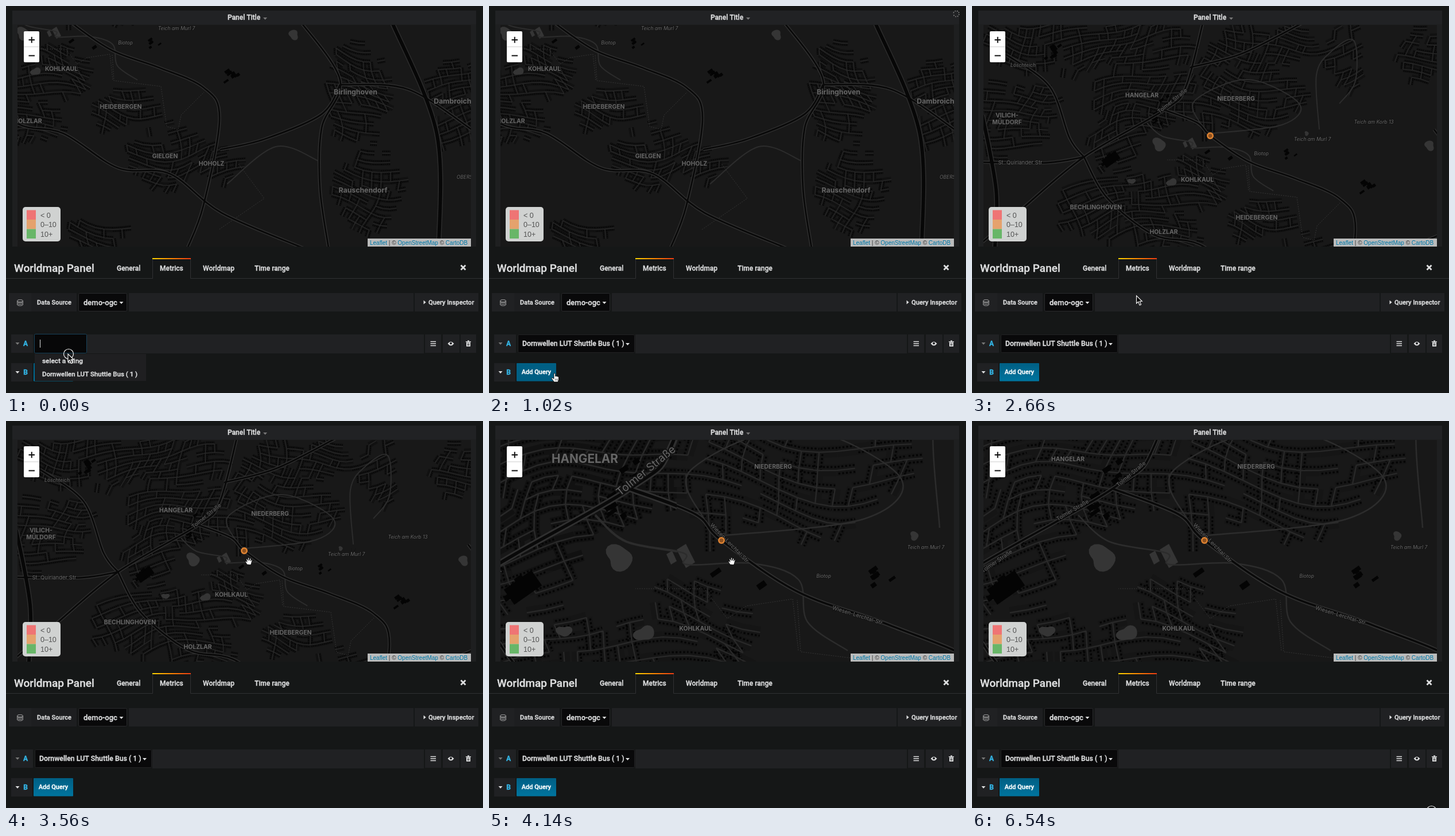
Write an HTML page with a canvas that moves like this. It is 831 px wide and 674 px high and loops after 6.64 s.

```html
<!DOCTYPE html>
<html lang="en">
<head>
<meta charset="utf-8">
<title>Worldmap panel</title>
<style>
html, body { margin: 0; width: 100%; height: 100%; overflow: hidden; background: #151717; }
canvas { display: block; }
</style>
</head>
<body>
<canvas id="stage" width="831" height="674"></canvas>
<script>
const ctx = document.getElementById('stage').getContext('2d');
const LOOP = 6640;
const THING = 'Dornwellen LUT Shuttle Bus ( 1 )';
const LIGHT = '#dedfe0', BOX = '#202123', BLUE = '#33b5e5';
const UI = 'Roboto, sans-serif', MAP = 'Inter, sans-serif', HELV = '"Liberation Sans", sans-serif';

// ---------- drawing helpers ----------
function rect(x, y, w, h, fill, stroke, radius = 0) {
  ctx.beginPath();
  ctx.roundRect(x, y, w, h, radius);
  if (fill) { ctx.fillStyle = fill; ctx.fill(); }
  if (stroke) { ctx.strokeStyle = stroke; ctx.lineWidth = 1; ctx.stroke(); }
}
function text(str, x, y, size, { color = LIGHT, weight = 500, family = UI, align = 'left', halo } = {}) {
  ctx.font = `${weight} ${size}px ${family}`;
  ctx.textAlign = align;
  // A hairline outline gives interface text its slightly heavy look.
  ctx.strokeStyle = halo ?? color;
  ctx.lineWidth = halo ? 2 : family === UI ? .35 : .01;
  ctx.strokeText(str, x, y + size * .36);
  ctx.fillStyle = color;
  ctx.fillText(str, x, y + size * .36);
}
function shape(d, fill, stroke, width = 1) {
  const path = new Path2D(d);
  if (fill) { ctx.fillStyle = fill; ctx.fill(path); }
  if (stroke) { ctx.strokeStyle = stroke; ctx.lineWidth = width; ctx.stroke(path); }
}
function circle(x, y, r, fill, stroke, width) {
  const d = `M${x - r} ${y}a${r} ${r} 0 1 0 ${2 * r} 0a${r} ${r} 0 1 0 ${-2 * r} 0z`;
  shape(d, fill, stroke, width);
}
function gradient(x0, y0, x1, y1, ...colors) {
  const g = ctx.createLinearGradient(x0, y0, x1, y1);
  colors.forEach((c, i) => g.addColorStop(i / (colors.length - 1), c));
  return g;
}
const caretDown = (x, y, color = LIGHT) => shape(`M${x - 3.5} ${y - 2}h7l-3.500 4z`, color);

let seed = 11;
const random = () => (seed = (seed * 16807) % 2147483647) / 2147483647;

// ---------- map, in the pixel coordinates of the middle view ----------
// Each settlement: name, centre and half size
const places = [
  ['HANGELAR', 296, 155, 95, 58], ['NIEDERBERG', 460, 161.5, 112, 58], ['VILICH-', 61, 190, 85, 62], ['MÜLDORF', 61, 202, 60, 60],
  ['KOHLKAUL', 392.5, 302.5, 42, 50], ['BECHLINGHOVEN', 216, 350, 72, 55], ['HEIDEBERGEN', 496, 368, 60, 36], ['HOLZLAR', 334, 393, 70, 35],
  ['GIELGEN', 573, 454, 68, 55], ['HOHOLZ', 654, 467, 45, 36],
  ['Birlinghoven', 905, 343, 55, 90], ['Rauschendorf', 918, 514, 60, 70], ['Dambroich', 1074, 359, 50, 75],
  ['', 130, 70, 120, 45], ['', 300, 70, 80, 50], ['', 500, 70, 95, 42], ['', 645, 85, 36, 55], ['', 775, 85, 36, 45],
  ['', 300, 335, 75, 45], ['', 245, 240, 40, 50], ['', 446, 590, 50, 30],
];
const smallLabels = [
  ['Löschteich', 89, 103], ['Biotop', 504, 257], ['Teich am Murl 7', 593, 232], ['Teich am Korb 13', 700, 202], ['OBERS', 1095, 491],
];
const farStreets = [['Tolmer Straße', 349, 165, -.68], ['St. Quirlander Str', 84, 273, 0]];
const nearStreets = [
  ['Tolmer Straße', 351, 168, -.7], ['Tolmer Straße', 300, 199.5, -.53], ['Tolmer Straße', 234, 244, -.6],
  ['Wiesen-Lerchtal-Str', 422, 228, .8], ['Wiesen-Lerchtal-Str', 533.5, 291, .3],
];

// Smooth path through the key points "x,y x,y ..."
function through(keys) {
  const p = keys.split(' ').map(k => k.split(',').map(Number)), path = new Path2D();
  path.moveTo(...p[0]);
  for (let i = 0; i < p.length - 1; i++) {
    const before = p[i - 1] ?? p[i], a = p[i], b = p[i + 1], after = p[i + 2] ?? b;
    path.bezierCurveTo(
      a[0] + (b[0] - before[0]) / 6, a[1] + (b[1] - before[1]) / 6,
      b[0] - (after[0] - a[0]) / 6, b[1] - (after[1] - a[1]) / 6, ...b);
  }
  return path;
}
const roads = [
  '15,414 85,355 195,263 335,181 372,142 402,30',
  '335,181 392,203 415,226 482,271 562,300 640,335 668,388 640,540 612,615',
  '195,263 236,335 316,398 396,415 491,475 581,485 671,553 815,615',
  '380,107 470,83 575,30',
  '15,272 130,273 195,263',
  '60,85 135,140 170,230 195,263',
  '669,443 746,425 845,382 878,330',
  '805,215 878,322 846,405 843,510 858,615',
  '879,330 996,338 1110,410',
].map(through);
const motorways = ['968,220 1046,413 1050,615', '18,190 42,320 40,420'].map(through);
const lanes = [
  '400,208 388,165 480,128 570,170 540,207 415,222',
  '605,215 600,120 625,80 665,60 668,130 640,170',
  '681,503 766,438 841,463',
  '305,204 332,227 382,237 385,247 442,246 482,260 490,297 525,322',
].map(through);
const footpaths = [
  'M340 268h60l20 26 17-11 40-6 5 45',
  'M481 278l3 45 82 10 10 70 20 5 5-25 40-40',
  'M701 468l45 60-80 55',
].map(d => new Path2D(d));

// Street net: a grid bent by waves, kept only inside settlements
function growStreets() {
  const streets = new Path2D(), houses = new Path2D(), gap = 14;
  const node = (i, j) => {
    const u = i * gap, v = j * gap;
    return [u + 22 * Math.sin(v / 60 + 1) + 7 * Math.sin(v / 23 + u / 40),
            v + 24 * Math.sin(u / 70) + 7 * Math.sin(u / 27 - v / 35)];
  };
  const inhabited = (x, y) => places.some(([, px, py, rx, ry]) =>
    ((x - px) / rx) ** 2 + ((y - py) / ry) ** 2 < 1 + .35 * Math.sin(x / 17) * Math.sin(y / 19));
  const line = (path, a, b, side) => {
    const length = Math.hypot(b[0] - a[0], b[1] - a[1]);
    const dx = -(b[1] - a[1]) / length * side, dy = (b[0] - a[0]) / length * side;
    path.moveTo(a[0] + dx, a[1] + dy);
    path.lineTo(b[0] + dx, b[1] + dy);
  };
  for (let i = -3; i < 83; i++) for (let j = -3; j < 48; j++) {
    const a = node(i, j);
    if (!inhabited(...a)) continue;
    for (const [b, chance] of [[node(i + 1, j), .88], [node(i, j + 1), .5]]) {
      if (random() > chance) continue;
      line(streets, a, b, 0);
      for (const side of [-3, 3]) if (random() < .8) line(houses, a, b, side);
    }
  }
  return { streets, houses };
}
const { streets, houses } = growStreets();

function lake([x, y, r]) {
  const path = new Path2D();
  for (let a = 0; a < 6.28; a += .25) {
    const d = r * (1 + .2 * Math.sin(2 * a + x) + .12 * Math.sin(3 * a + y));
    path.lineTo(x + d * Math.cos(a), y + d * .85 * Math.sin(a));
  }
  return path;
}
const lakes = [[326, 241, 12], [348, 307, 8], [278, 305, 6], [288, 428, 6], [583, 222, 4], [797, 243, 9]].map(lake);
lakes.push(new Path2D('M376 234l8-5 8 16-8 5zM367 238l5-3 4 9-5 3z'));

// Large buildings: slanted boxes scattered around a point
function buildings([x, y, count, size]) {
  const path = new Path2D();
  for (let i = 0; i < count; i++) {
    const w = size * (.6 + random() * .8), h = size * (.4 + random() * .4), spread = size * Math.min(count - 1, 3);
    const bx = x + (random() - .5) * spread, by = y + (random() - .5) * spread;
    path.addPath(new Path2D(`M${-w / 2} ${-h / 2}h${w}v${h}h${-w}z`), new DOMMatrix().translate(bx, by).rotate(-35));
  }
  return path;
}
const blocks = [
  [242, 267, 1, 24], [238, 270, 5, 7], [324, 197, 6, 7], [340, 168, 5, 8], [410, 254, 1, 8], [450, 265, 1, 9],
  [555, 258, 6, 6], [690, 313, 9, 8], [140, 80, 9, 10],
].map(buildings);

// tileScale: how far already rendered tiles are stretched during a zoom
function drawMap({ scale, x, y }, tileScale = 1, marker = true, clip = [20, 33, 790, 386]) {
  const near = scale / tileScale > 1.5, px = tileScale / scale, widen = near ? 1.25 : 1;
  ctx.save();
  ctx.beginPath();
  ctx.rect(...clip);
  ctx.clip();
  rect(...clip, '#181818');

  ctx.save();
  ctx.translate(x, y);
  ctx.scale(scale, scale);
  ctx.lineJoin = 'round';
  const fill = (paths, color) => {
    ctx.fillStyle = color;
    paths.forEach(p => ctx.fill(p));
  };
  const trace = (paths, color, width, dash = []) => {
    ctx.strokeStyle = color;
    ctx.lineWidth = width;
    ctx.setLineDash(dash);
    paths.forEach(p => ctx.stroke(p));
  };
  trace([streets], near ? '#151515' : '#111', 10);
  trace([houses], '#050505', 1.7, [1.7, 1.6]);
  trace([streets], '#282828', (near ? 2.4 : 1.3) * px);
  fill(lakes, '#353535');
  fill(blocks, '#040404');
  trace(lanes, '#2c2c2c', 2 * widen * px);
  trace(footpaths, '#353535', px, [2 * px, 2 * px]);
  trace(roads, '#303030', 5.5 * widen * px);
  trace(motorways, '#2c2c2c', 9 * px);
  trace(roads, '#090909', 2.8 * widen * px);
  trace(motorways, '#070707', 6 * px);
  ctx.restore();

  const label = (str, lx, ly, size, weight, angle = 0) => {
    ctx.save();
    ctx.translate(lx * scale + x, ly * scale + y);
    ctx.rotate(angle);
    ctx.scale(tileScale, tileScale);
    text(str, 0, 0, size, { color: '#666', weight, family: MAP, align: 'center', halo: '#141414' });
    ctx.restore();
  };
  (near ? nearStreets : farStreets).forEach(([str, lx, ly, angle]) => label(str, lx, ly, 9.5, 400, angle));
  smallLabels.forEach(([str, lx, ly]) => label(str, lx, ly, 8.5, 'italic 400'));
  places.forEach(([str, lx, ly]) => label(str, lx, ly, str === str.toUpperCase() ? 10.4 : 12.3, 700));
  if (marker) circle(415 * scale + x, 226 * scale + y, 4.7 * tileScale, '#8f5220', '#e08432', 2.5 * tileScale);
  ctx.restore();
}

const zoomView = scale => ({ scale, x: 425 * (1 - scale), y: 244 * (1 - scale) });
const panView = part => ({ scale: 1, x: -296 * part, y: -193 * part });
function drawMapAt(t) {
  if (t < 1170) drawMap(panView(1), 1, false);
  else if (t < 1320) drawMap(panView(.25));
  else if (t < 3990) drawMap(zoomView(1));
  else if (t < 4140) drawMap(zoomView(1.8), 1.8);
  else {
    drawMap(zoomView(2));
    if (t < 4290) drawMap(zoomView(2), 2, false, [20, 33, 307, 228]);
  }
}

// ---------- interface ----------
function drawMapControls() {
  rect(31, 44, 27, 54, '#fff', null, 2);
  rect(31, 70.5, 27, 1, '#ccc');
  shape('M39.500 59h10.500M44.750 53.750v10.500M39.500 86.500h10.500', null, '#111', 2);
  rect(29, 350, 66, 60, '#d0d2d1', null, 5);
  [['#ef7474', '< 0'], ['#e5a26d', '0–10'], ['#68b668', '10+']].forEach(([color, str], i) => {
    rect(36, 355.5 + i * 16.5, 16, 16.5, color);
    text(str, 60, 364 + i * 16.5, 12.5, { color: '#555', weight: 400, family: HELV });
  });
  rect(630, 405, 180, 14, '#babbbb');
  let x = 634;
  for (const part of ['Leaflet', ' | © ', 'OpenStreetMap', ' © ', 'CartoDB']) {
    text(part, x, 412, 10, { color: part[0] === ' ' ? '#333' : '#0078a8', weight: 400, family: HELV });
    x += ctx.measureText(part).width;
  }
}

function drawPanel(t) {
  rect(0, 0, 831, 674, '#151717');
  rect(11, 8, 808, 411, '#1e1f20');
  rect(11, 8, 808, 24, '#212224');
  text('Panel Title', 414.5, 20, 12, { align: 'center' });
  if (t < 5190) caretDown(451.5, 22, '#777');
  drawMapAt(t);
  drawMapControls();
  if (t >= 730 && t < 1170) {
    ctx.setLineDash([1.6, 2]);
    ctx.lineDashOffset = t / 120;
    circle(814, 13.5, 5, null, '#8a8a8a', 1.6);
    ctx.setLineDash([]);
  }
}

function drawTabs() {
  text('Worldmap Panel', 14, 456, 19);
  shape('M0 474.500H255.500V440M321.500 440V474.500H831', null, '#303133');
  rect(255, 439, 67, 2, gradient(255, 0, 322, 0, '#ffd500', '#ff8800', '#ee3b12'));
  [['General', 193], ['Metrics', 268], ['Worldmap', 343], ['Time range', 433]]
    .forEach(([str, x]) => text(str, x, 456.5, 12));
  shape('M792.500 451.500l8 8m0-8l-8 8', null, LIGHT, 2.8);
}

function drawSourceRow() {
  rect(5, 500, 118, 32, BOX);
  rect(44, 500, 79, 32, '#1d1e20');
  shape('M19.500 513.500a5 2 0 0 1 10 0a5 2 0 0 1-10 0', null, '#aaa');
  for (const y of [513.5, 516, 518.5]) shape(`M19.500 ${y}v1.500a5 2 0 0 0 10 0v-1.500`, null, '#aaa');
  text('Data Source', 84, 516, 11, { align: 'center' });
  rect(126.5, 500.5, 84, 31, '#09090a', '#29292c', 2);
  text('demo-ogc', 135, 516, 13);
  caretDown(201, 517);
  rect(214, 500, 496, 32, BOX);
  rect(712, 500, 111, 32, BOX);
  shape('M727.500 512.500l4 3.500-4 3.500z', LIGHT);
  text('Query Inspector', 736, 516, 11.2);
}

function drawRowIcons() {
  for (const [x, w] of [[730, 28], [761, 29], [792, 27]]) rect(x, 572, w, 32, BOX);
  shape('M739.500 584.500h9.500m-9.500 3.500h9.500m-9.500 3.500h9.500', null, LIGHT, 1.6);
  shape('M769.500 588q5.500-7 11 0q-5.500 7-11 0z', LIGHT);
  circle(775, 587.5, 2, BOX);
  shape('M801 584h3v-1.500h3v1.500h3v1.500h-9zM802 586h7v7h-7z', LIGHT);
  shape('M804.500 587.500v4m2 0v-4', null, BOX);
}

function drawQueryRows(t) {
  const picking = t < 730, hovered = t >= 870 && t < 2660, heading = { color: BLUE, weight: 700, align: 'center' };
  rect(9, 572, 38, 32, BOX);
  caretDown(20, 588, '#777');
  text('A', 34, 588, 12, heading);
  const left = picking ? 141 : 255;
  rect(left, 572, 728 - left, 33, BOX);
  drawRowIcons();

  rect(9, 622, 37, 32, BOX);
  caretDown(20, 638);
  text('B', 34, 638, 12, heading);
  rect(48, 622, 69, 31.5, hovered ? '#005f84' : gradient(0, 622, 0, 654, '#005f84', '#00759f'), null, 1);
  text('Add Query', 82.5, 637.5, 11, { color: '#fff', align: 'center' });

  if (!picking) {
    rect(50.5, 572.5, 203, 31, '#09090a', '#222224', 2);
    text(THING, 58, 588, 12.3);
    caretDown(241.5, 589);
    return;
  }
  rect(49.5, 571.5, 91, 33, '#070708', '#17425a', 2);
  if (t < 300) rect(59, 581, 1, 14, LIGHT);
  rect(50, 606, 194, 47, '#1f1f21');
  text('select a thing', 63, 618, 11.8);
  text(THING, 63, 641, 11.5, { color: t < 440 ? LIGHT : '#fff' });
}

// ---------- pointer ----------
const pointers = {
  arrow: 'M0 0V13.500L3.200 10.500L5.600 16.500L8 15.500L5.600 9.800H9.800Z',
  point: 'M-1 1q0-1.500 1.200-1.500t1.300 1.500v4q1-1 2.200 0q1-.6 2 .4q1.700-.4 1.700 1.400v4l-1.400 4h-6.500l-4.500-6q0-2 2-1l2 1.500z',
  grab: 'M-3 6L-6 1q0-1.500 1.500-1l1.500 1.500L-4.300-3q.8-1.800 2-.3l1 2.300-.3-4.300q1.200-1.500 2.100 0l.4 4.300 1-3.700q1.500-1 1.900.5l-.5 4 1.200-2q1.500-.8 1.500.7L4.500 3.500 3.500 6.500z',
};
const moves = [
  { start: 0, end: 440, from: [108, 606], to: [114, 640], ease: u => u },
  { start: 2660, end: 3560, from: [286.5, 504.5], to: [423, 244], ease: u => 1 - (1 - u) ** 6 },
  { start: 5040, end: 5041, from: [612, 566], to: [612, 566], ease: u => u },
];
function pointerKind(t) {
  if (t >= 2810 && t < 5040) return 'grab';
  return t >= 440 && t < 2660 ? 'point' : 'arrow';
}
function drawPointer(t) {
  if (t >= 6540) circle(800.5, 679, 8.5, null, '#eee', 1.2);
  if (t >= 5190) return;
  const { start, end, from, to, ease } = moves.findLast(m => m.start <= t);
  const part = ease(Math.min(1, (t - start) / (end - start)));
  const [x, y] = from.map((v, i) => v + (to[i] - v) * part), kind = pointerKind(t), arrow = kind === 'arrow';
  if (t === 0) circle(x + 1, y, 8.5, null, '#eee', 1.2);
  if (t === 3700) circle(x + 1.5, y - 2, 8.5, null, '#eee', 1.2);
  ctx.save();
  ctx.translate(x, y);
  shape(pointers[kind], arrow ? '#000' : '#fff', arrow ? '#fff' : '#000', arrow ? 1.1 : .8);
  if (kind === 'point') shape('M1.500 9v3.500m2 0v-3.500m2 0v3.500', null, '#333', .7);
  ctx.restore();
}

// ---------- playback: the picture only changes at these moments ----------
const changes = [0, 150, 300, 440, 590, 730, 870, 1020, 1170, 1320, 2660, 2810, 2960, 3110, 3410, 3560, 3700, 3990, 4140, 4290, 5040, 5190, 6540];
let shown;
function tick(now) {
  const t = changes.findLast(c => c <= now % LOOP) ?? 0;
  if (t !== shown) {
    shown = t;
    drawPanel(t);
    drawTabs();
    drawSourceRow();
    drawQueryRows(t);
    drawPointer(t);
  }
  requestAnimationFrame(tick);
}
tick(0);
</script>
</body>
</html>
```
